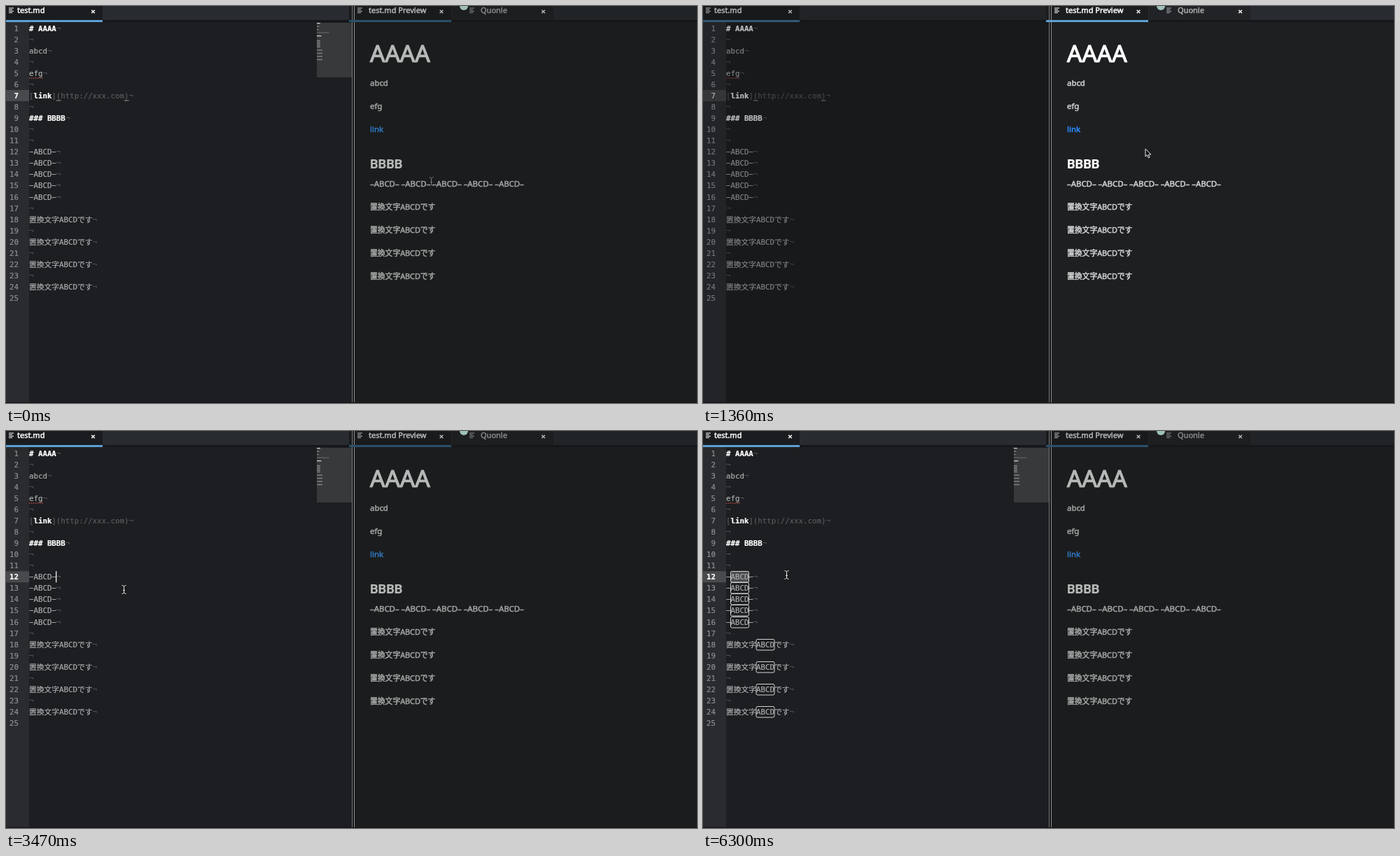
An HTML page with a canvas that plays this animation: 987x567 px, repeating every 8000 ms.

```html
<!DOCTYPE html>
<html lang="en">
<head>
<meta charset="utf-8">
<title>Markdown editor</title>
<style>
html, body { margin: 0; width: 100%; height: 100%; overflow: hidden; background: #1b1c1e; }
canvas { display: block; }
</style>
</head>
<body>
<canvas id="stage" width="987" height="567"></canvas>
<script>
const ctx = document.getElementById('stage').getContext('2d');
const LOOP = 8000;
const CHAR = 6.472, FIRST_ROW = 31.6, ROW = 16.06, TEXT_X = 33;
const MONO = '"DejaVu Sans Mono", "Noto Sans CJK JP", "Noto Sans CJK", monospace';
const SANS = '"Noto Sans", "Noto Sans CJK JP", "Noto Sans CJK", sans-serif';
const CODE = '10.75px ' + MONO, CODE_BOLD = 'bold ' + CODE;
const TAB = '11px ' + SANS, BODY = '11.4px ' + SANS, JAPANESE = '10.8px ' + SANS;
const MEDIUM = 0.5;

const item = '−ABCD−', previewItem = '–ABCD–', sentence = '置換文字ABCDです';
const lines = ['# AAAA', '', 'abcd', '', 'efg', '', '[link](http://xxx.com)', '', '### BBBB', '', '',
  item, item, item, item, item, '', sentence, '', sentence, '', sentence, '', sentence, ''];

const editorFocused = {
  bg: '#1d1e21', gutter: '#292b2e', row: '#484a4d', number: '#8e9194', rowNumber: '#ffffff',
  text: '#acaeb0', bold: '#ffffff', faint: '#595b5d', mark: '#505255', error: '#c04a48',
  tab: '#1a1c1f', bar: '#282b2f', line: '#5d9fd3', title: '#ffffff'
};
const editorBlurred = {
  bg: '#18191b', gutter: '#222427', row: '#343638', number: '#737578', rowNumber: '#b0b1b2',
  text: '#7f8183', bold: '#b9baba', faint: '#444648', mark: '#3d3f41', error: '#843937',
  tab: '#18191b', bar: '#212326', line: '#315773', title: '#b4b5b6'
};
const previewFocused = {
  bg: '#1d1f21', bar: '#282b30', tab: '#1b1d1f', idle: '#212326', line: '#5d9fd3', title: '#ffffff',
  idleTitle: '#abadaf', heading: '#ffffff', text: '#d2d3d3', link: '#2c8cff'
};
const previewBlurred = {
  bg: '#1b1c1d', bar: '#212427', tab: '#191a1c', idle: '#1c1e20', line: '#2b5069', title: '#b6b7b8',
  idleTitle: '#85878a', heading: '#b7b8b8', text: '#a3a4a4', link: '#2f78c2'
};

// [start time, x, y, shape]
const pointerSteps = [
  [0, 607, 250, 'dim'], [770, 613, 247, 'dim'], [920, 631, 215, 'dim'], [1070, 632, 204, 'arrow'],
  [1810, 632, 211, 'beam'], [1950, 394, 208, 'beam'], [2100, 366, 202, 'beam'], [3320, 342, 213, 'beam'],
  [3470, 168, 226, 'beam'], [3620, 156, 225, 'beam'], [3770, 150, 219, 'beam'], [3910, 129, 206, 'beam'],
  [4060, 120, 205, 'beam'], [4210, 119, 205, 'beam']
];
// [start time, caret column or -1 when hidden]
const caretSteps = [[0, -1], [300, 22], [630, -1], [1070, 22], [1360, -1], [2700, 6], [3000, -1],
  [3470, 6], [3910, -1], [4210, 6], [4650, 5], [5250, -1]];
// [start time, first selected column]; the selection ends at column 5
const selectionSteps = [[0, 5], [5550, 4], [5700, 3], [6000, 2], [6300, 1]];

const stepAt = (steps, t) => steps.findLast(step => step[0] <= t);
const rowY = number => FIRST_ROW + (number - 1) * ROW;
const columnX = column => TEXT_X + column * CHAR;

function rect(x, y, w, h, color) {
  ctx.fillStyle = color;
  ctx.fillRect(x, y, w, h);
}

// A thin outline of the same colour makes the strokes heavier.
function text(string, x, y, font, color, weight = 0.2) {
  ctx.font = font;
  ctx.fillStyle = ctx.strokeStyle = color;
  ctx.lineWidth = weight;
  ctx.lineJoin = 'miter';
  ctx.miterLimit = 2;
  ctx.fillText(string, x, y);
  ctx.strokeText(string, x, y);
}

function path(points, color, width) {
  ctx.beginPath();
  points.forEach(([x, y]) => ctx.lineTo(x, y));
  ctx.strokeStyle = color;
  ctx.lineWidth = width;
  ctx.stroke();
}

function tabLabel(iconX, labelX, closeX, label, color, closeColor = color) {
  [7, 5, 7, 5].forEach((w, i) => rect(iconX, 2.5 + i * 2.2, w, 1, color));
  text(label, labelX, 9.6, TAB, color, MEDIUM);
  path([[closeX - 2.3, 5.7], [closeX + 2.3, 10.3]], closeColor, 1.4);
  path([[closeX - 2.3, 10.3], [closeX + 2.3, 5.7]], closeColor, 1.4);
}

function drawCodeLine(string, number, theme) {
  const y = rowY(number) + 4;
  if (string[0] === '#') {
    text(string, TEXT_X, y, CODE_BOLD, theme.bold);
  } else if (string[0] === '[') {
    text('[', TEXT_X, y, CODE, theme.faint);
    text('link', columnX(1), y, CODE_BOLD, theme.bold);
    text(string.slice(5), columnX(5), y, CODE, theme.faint);
  } else {
    text(string, TEXT_X, y, CODE, theme.text);
  }
  if (number < lines.length) {
    ctx.font = CODE;
    text('¬', TEXT_X + ctx.measureText(string).width, y, CODE, theme.mark);
  }
}

function drawMinimap() {
  rect(444, 24, 50, 78, '#37393b');
  lines.forEach((string, i) => {
    const color = string[0] === '#' ? '#d8d8d8' : string[0] === '[' ? '#646668' : '#8a8c8e';
    rect(444, 24 + i * 2.26, string.length * 0.8, 1.2, color);
  });
}

function drawEditor(t, focused) {
  const theme = focused ? editorFocused : editorBlurred;
  const current = t < 2700 ? 7 : 12;
  rect(0, 0, 494, 567, theme.bg);
  rect(0, 0, 490, 20, theme.bar);
  rect(0, 20, 490, 3, '#15171a');
  rect(0, 0, 138, 20, theme.tab);
  rect(0, 20, 138, 3, theme.line);
  tabLabel(4, 16, 124.5, 'test.md', theme.title);
  rect(0, 23, 33, 544, theme.gutter);
  rect(0, rowY(current) - 8, 33, 16, theme.row);
  if (focused) drawMinimap();

  const first = stepAt(selectionSteps, t)[1];
  if (first < 5) rect(columnX(first), 200, (5 - first) * CHAR, 16.5, '#4b4d50');

  lines.forEach((string, i) => {
    const number = i + 1, active = number === current;
    text(number, 18 - String(number).length * CHAR, rowY(number) + 4,
      active && focused ? CODE_BOLD : CODE, active ? theme.rowNumber : theme.number);
    drawCodeLine(string, number, theme);
    if (first === 1 && string.includes('ABCD')) {
      const x = string === item ? 39.5 : 76;
      ctx.beginPath();
      ctx.roundRect(x, Math.round(rowY(number)) - 7.5, 26, 15.5, 2);
      ctx.strokeStyle = '#d3d4d4';
      ctx.lineWidth = 1;
      ctx.stroke();
    }
  });

  for (let x = 33; x < 52; x += 3) rect(x, 102.5, 1.7, 1.2, theme.error);
  if (current === 7) [6, 21].forEach(c => rect(columnX(c), 134.5, 6.5, 1, focused ? '#a1a398' : '#727469'));
  const caret = stepAt(caretSteps, t)[1];
  if (caret >= 0) rect(Math.floor(columnX(caret)), rowY(current) - 8, 1.3, 16, '#f2f2f2');
}

function drawPreview(focused) {
  const theme = focused ? previewFocused : previewBlurred;
  rect(494, 0, 4, 567, '#121314');
  rect(498, 0, 489, 567, theme.bg);
  rect(498, 0, 489, 20, theme.bar);
  rect(498, 20, 489, 3, '#15171a');
  rect(490, 0, 146, 20, theme.tab);
  rect(637, 0, 145, 20, theme.idle);
  rect(494, 0, 1, 567, '#77797a');
  rect(497, 0, 1, 567, '#8e9091');
  rect(490, 20, 146, 3, theme.line);
  tabLabel(502, 518, 622, 'test.md Preview', theme.title);
  ctx.beginPath();
  ctx.arc(654, 0, 6, 0, 7);
  ctx.fillStyle = '#9fc0b8';
  ctx.fill();
  tabLabel(662, 678, 767.5, 'Quonle', theme.idleTitle, theme.title);

  text('AAAA', 520, 80, '33.5px ' + SANS, theme.heading, 1.2);
  text('abcd', 520, 114, BODY, theme.text, MEDIUM);
  text('efg', 520, 147, BODY, theme.text, MEDIUM);
  text('link', 520, 180, BODY, theme.link, MEDIUM);
  text('BBBB', 520, 232, 'bold 18.2px Roboto, sans-serif', theme.heading);
  text(Array(5).fill(previewItem).join(' '), 520, 258, BODY, theme.text, MEDIUM);
  for (let i = 0; i < 4; i++) text(sentence, 520, 291 + i * 33, JAPANESE, theme.text, MEDIUM);
}

function drawPointer(t) {
  const [, x, y, shape] = stepAt(pointerSteps, t);
  if (shape === 'arrow') {
    ctx.beginPath();
    [[0, 0], [0, 11], [2.5, 8.8], [4.3, 12.8], [6, 12], [4.3, 8.2], [7.8, 8]]
      .forEach(([dx, dy]) => ctx.lineTo(x + dx, y + dy));
    ctx.closePath();
    ctx.fillStyle = '#101010';
    ctx.fill();
    ctx.strokeStyle = '#eeeeee';
    ctx.lineWidth = 1;
    ctx.stroke();
    return;
  }
  const color = shape === 'dim' ? '#77797a' : '#e4e4e4';
  path([[x - 2.5, y - 5.5], [x - 0.5, y - 5], [x + 0.5, y - 4], [x + 1.5, y - 5], [x + 3.5, y - 5.5]], color, 1);
  path([[x + 0.5, y - 4], [x + 0.5, y + 5]], color, 1);
  path([[x - 2.5, y + 6.5], [x - 0.5, y + 6], [x + 0.5, y + 5], [x + 1.5, y + 6], [x + 3.5, y + 6.5]], color, 1);
  path([[x - 1, y + 1.5], [x + 2, y + 1.5]], color, 1);
}

function frame() {
  const t = performance.now() % LOOP;
  const previewActive = t >= 1360 && t < 2700;
  drawEditor(t, !previewActive);
  drawPreview(previewActive);
  drawPointer(t);
  rect(0, 566, 987, 1, '#151113');
  requestAnimationFrame(frame);
}
frame();
</script>
</body>
</html>
```
